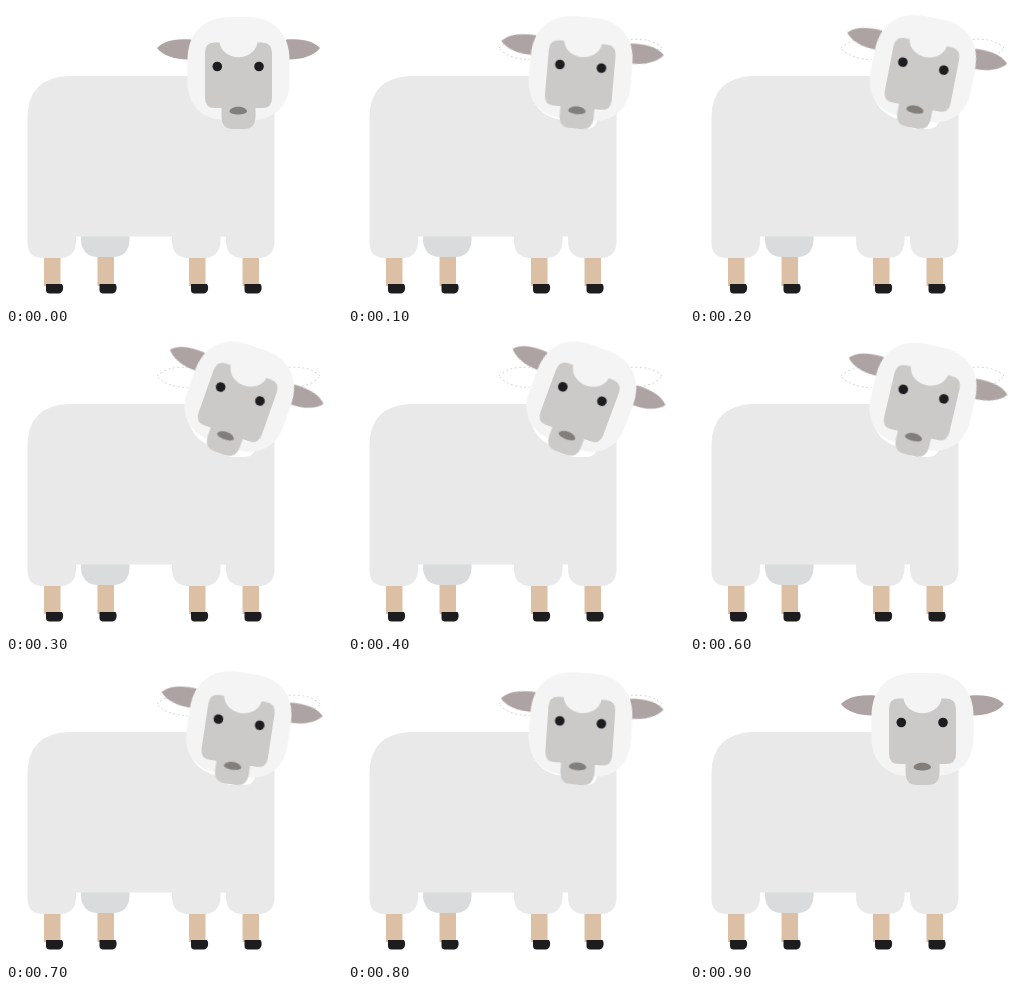
Animation, 336 px wide and 300 px high, one loop 8000 ms. Source, as an HTML page:

```html
<!DOCTYPE html>
<html lang="en">
<head>
<meta charset="utf-8">
<title>Sheep tilting its head</title>
<style>
  html, body { margin: 0; width: 100%; height: 100%; overflow: hidden; background: #fff; }
  svg { display: block; width: 336px; height: 300px; }
  .wool { fill: #e9e9e9; }
  .udder { fill: #d9dbdc; }
  .leg { fill: #dbc0a5; }
  .hoof, .eye { fill: #1d1d20; }
  .ear { fill: #aea3a3; }
  .fleece { fill: #f4f4f4; }
  .face { fill: #cbcac9; }
  .mouth { fill: #827e7b; }
  .gap { fill: #fff; animation: gap 8s step-end infinite; }
  .gap .rim { stroke: #c4c4c4; stroke-width: .7; stroke-dasharray: 2 2.5; }
  .head { transform-origin: 234.5px 66.5px; animation: tilt 8s step-end infinite; }
  /* one pose every 100 ms, then a long rest */
  @keyframes tilt {
    0% { transform: rotate(0); }
    1.25% { transform: rotate(5deg); }
    2.5% { transform: rotate(11deg); }
    3.75% { transform: rotate(19.5deg); }
    5% { transform: rotate(20.3deg); }
    6.25% { transform: rotate(18.3deg); }
    7.5% { transform: rotate(13.2deg); }
    8.75% { transform: rotate(8.5deg); }
    10% { transform: rotate(4deg); }
    11.25%, 100% { transform: rotate(0); }
  }
  @keyframes gap {
    0% { visibility: hidden; }
    1.25% { visibility: visible; }
    11.25%, 100% { visibility: hidden; }
  }
</style>
</head>
<body>
<svg viewBox="0 0 336 300">
  <defs>
    <path id="ear" d="M151 42C157 36 166 32 185 33.5V53.5C170 54 157 50 151 42Z"/>
    <path id="skull" d="M224 11H241C268 11 283.500 28 283.500 54V76C283.500 99 269 114 246 114H219C196 114 181.500 99 181.500 76V54C181.500 28 197 11 224 11Z"/>
    <path id="chin" d="M215.500 100H249.500V110Q249.500 123 238 123H227Q215.500 123 215.500 110Z"/>
    <g id="limb">
      <path class="leg" d="M0 250H16.500V280H0Z"/>
      <path class="hoof" d="M2 278H18Q20 281 18.500 285Q17 288 12 287.500H5Q2 287 2 284Z"/>
    </g>
  </defs>

  <use href="#limb" x="38"/>
  <use href="#limb" x="91.500"/>
  <use href="#limb" x="183"/>
  <use href="#limb" x="236.500"/>
  <path class="udder" d="M75 229H123.500V235Q122 251 107 251H92Q77 251 75 235Z"/>
  <path class="wool" d="M62 70H250Q268.500 70 268.500 88V236Q268 252 252 252H237Q221 252 220 236V230.500H214.500V236Q213 252 198 252H183Q167 252 166 236V230.500H70V236Q69 252 54 252H37Q21.500 252 21.500 236V111Q22 72 62 70Z"/>

  <g class="gap">
    <use class="rim" href="#ear"/>
    <use class="rim" href="#ear" transform="translate(465) scale(-1 1)"/>
    <use href="#skull"/>
    <use href="#chin"/>
  </g>

  <g class="head">
    <use class="ear" href="#ear"/>
    <use class="ear" href="#ear" transform="translate(465) scale(-1 1)"/>
    <use class="fleece" href="#skull"/>
    <path class="face" d="M208 36.500H213.500C217 56 248 56 251.500 36.500H256Q266 36.500 266 47V92Q266 102 256 102H209Q199 102 199 92V47Q199 36.500 208 36.500Z"/>
    <use class="face" href="#chin"/>
    <circle class="eye" cx="211.300" cy="60.500" r="4.800"/>
    <circle class="eye" cx="253" cy="60.500" r="4.800"/>
    <path class="mouth" d="M223.500 105.500C224 99 240.500 99 241 105.500C240 109.500 224.500 109.500 223.500 105.500Z"/>
  </g>
</svg>
</body>
</html>
```
